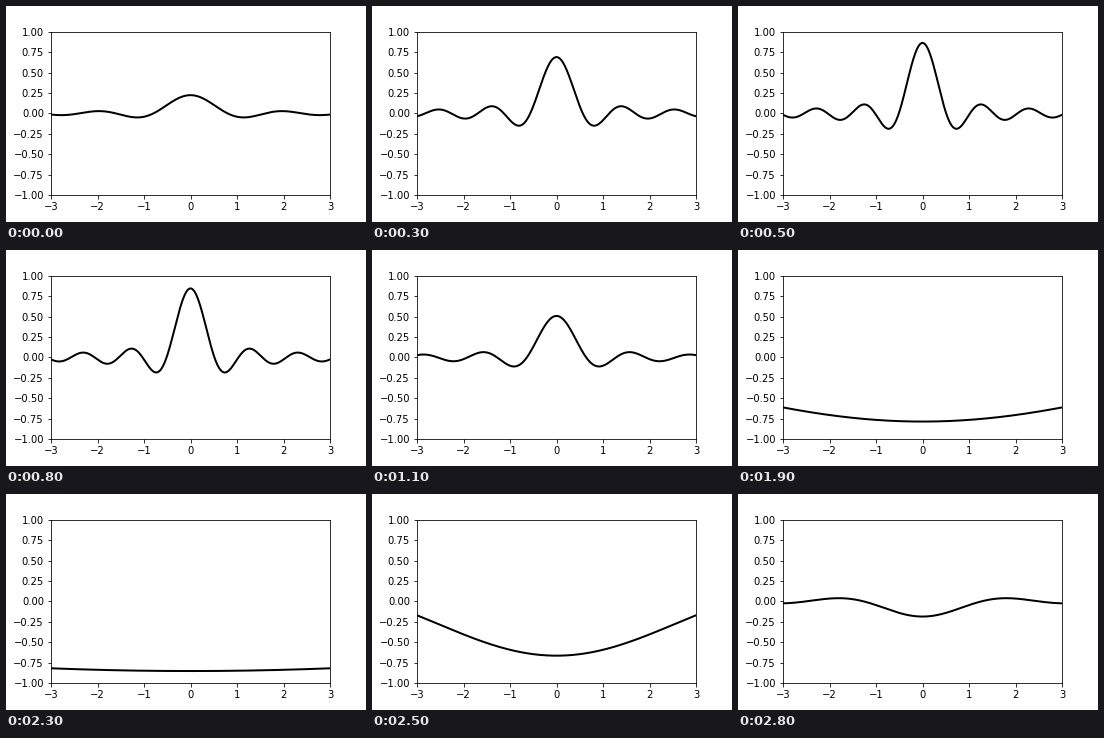
A matplotlib script that plays this animation: 360x216 px, repeating every 2900 ms.

```python
import numpy as np
import matplotlib.pyplot as plt
from matplotlib.animation import FuncAnimation

FRAMES = 29
INTERVAL = 100
PHASE, STEP = 0.252, 0.208
AMPLITUDE = 0.9

plt.rcParams.update({"font.family": "DejaVu Sans", "font.size": 10})

fig, ax = plt.subplots(figsize=(5, 3), dpi=72, facecolor="white")
fig.subplots_adjust(left=0.125, right=0.9, bottom=0.125, top=0.88)
ax.set_xlim(-3, 3)
ax.set_ylim(-1, 1)
ax.set_xticks(np.arange(-3, 4))
ax.set_yticks(np.linspace(-1, 1, 9))

x = np.linspace(-3, 3, 601)
line, = ax.plot([], [], color="black", lw=2)


def wave(i):
    # One oscillation drives both the height and the width of the sinc.
    s = np.sin(PHASE + STEP * i)
    return AMPLITUDE * s * np.sinc((1 + s) * x)


def update(i):
    line.set_data(x, wave(i))
    return line,


def init():
    return update(0)


anim = FuncAnimation(fig, update, frames=FRAMES, init_func=init,
                     interval=INTERVAL, repeat=True, repeat_delay=0)
plt.show()
```
